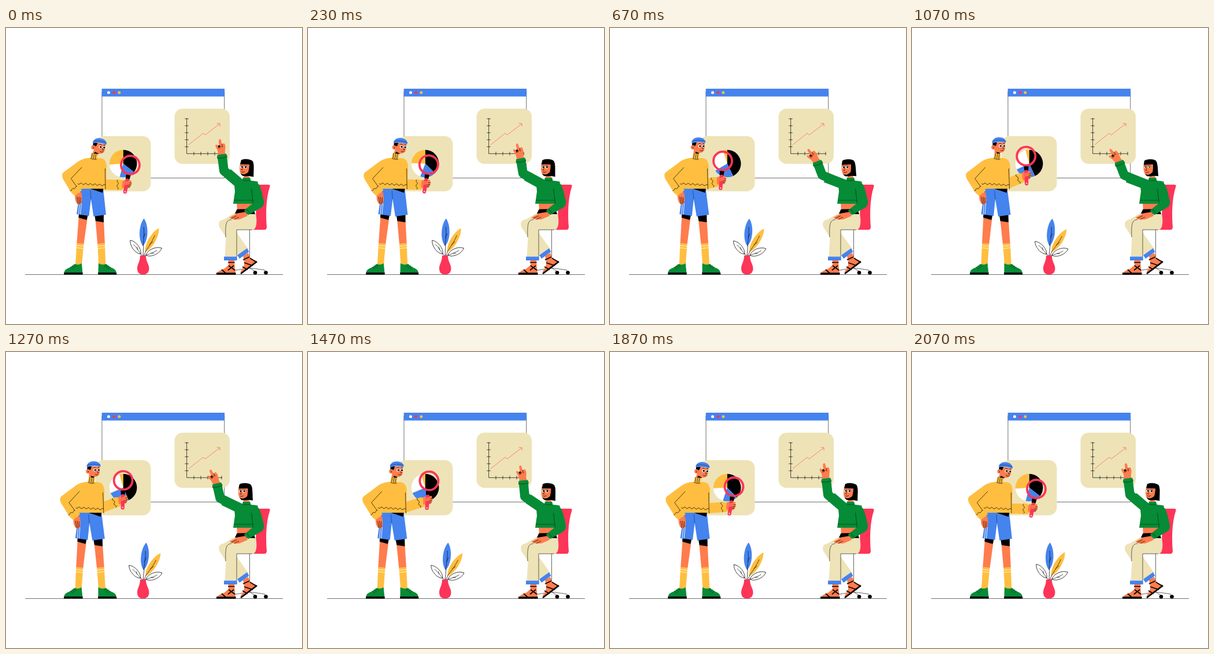
An HTML page with a canvas that plays this animation: 512x512 px, repeating every 2.1 s.

```html
<!DOCTYPE html>
<html>
<head>
<meta charset="utf-8">
<style>
html, body { margin: 0; width: 100%; height: 100%; overflow: hidden; background: #fff; }
canvas { display: block; width: 512px; height: 512px; }
</style>
</head>
<body>
<canvas id="stage" width="512" height="512"></canvas>
<script>
const ctx = document.getElementById('stage').getContext('2d');
const LOOP = 2100;
const BLUE = '#4583ee', RED = '#fd3558', YELLOW = '#ffbe40', GREEN = '#068b36';
const SKIN = '#ff7c4d', SAND = '#eee3b7', INK = '#000', WHITE = '#fff';
const TIMES = [0, 430, 670, 1070, 1470, 1670, 2070];

// Monotone cubic through one value per key time; the loop closes on the first.
function key(t, ...vals) {
  const v = [...vals, vals[0]];
  const last = TIMES.length - 1;
  if (t >= TIMES[last]) return v[last];
  const slope = i => (v[i + 1] - v[i]) / (TIMES[i + 1] - TIMES[i]);
  const tangent = i => {
    if (i === 0 || i === last) return 0;
    const a = slope(i - 1), b = slope(i);
    return a * b <= 0 ? 0 : 2 * a * b / (a + b);
  };
  let i = 0;
  while (t >= TIMES[i + 1]) i++;
  const h = TIMES[i + 1] - TIMES[i], u = (t - TIMES[i]) / h;
  const w = 1 - u;
  return v[i] * (1 + 2 * u) * w * w + v[i + 1] * u * u * (3 - 2 * u) +
    h * (tangent(i) * u * w * w - tangent(i + 1) * u * u * w);
}

const manLean = t => key(t, 0, -2, -3, -4, -3, -2);

function fill(d, color) {
  ctx.fillStyle = color;
  ctx.fill(new Path2D(d));
}

function line(d, color = INK, width = 0.7) {
  ctx.strokeStyle = color;
  ctx.lineWidth = width;
  ctx.stroke(new Path2D(d));
}

function dot(x, y, r, color) {
  ctx.fillStyle = color;
  ctx.beginPath();
  ctx.arc(x, y, r, 0, Math.PI * 2);
  ctx.fill();
}

function panel(x, y, w, h) {
  ctx.fillStyle = SAND;
  ctx.beginPath();
  ctx.roundRect(x, y, w, h, 14);
  ctx.fill();
}

function group(x, y, deg, draw) {
  ctx.save();
  ctx.translate(x, y);
  ctx.rotate(deg * Math.PI / 180);
  draw();
  ctx.restore();
}

function wave(x1, y1, x2, y2, turns, amp) {
  const len = Math.hypot(x2 - x1, y2 - y1);
  const nx = (y1 - y2) / len, ny = (x2 - x1) / len;
  ctx.beginPath();
  for (let i = 0; i <= 60; i++) {
    const u = i / 60, s = amp * Math.sin(u * turns * Math.PI * 2);
    ctx.lineTo(x1 + (x2 - x1) * u + nx * s, y1 + (y2 - y1) * u + ny * s);
  }
  ctx.strokeStyle = INK;
  ctx.lineWidth = 0.8;
  ctx.stroke();
}

function eye(x, y, open) {
  if (open < 0.25) {
    line(`M${x - 2.5} ${y}Q${x} ${y + 2} ${x + 2.5} ${y}`, INK, 0.9);
    return;
  }
  ctx.save();
  ctx.translate(x, y);
  ctx.scale(1, open);
  dot(0, 0, 2.5, WHITE);
  dot(0.5, 0, 1.6, INK);
  ctx.restore();
}

function blink(t, at) {
  return Math.min(1, Math.abs(t - at) / 110);
}

function board() {
  line('M166 110V259.5H377.7V110', '#333');
  ctx.fillStyle = BLUE;
  ctx.fillRect(165.7, 105, 212.4, 13.5);
  [WHITE, RED, YELLOW].forEach((c, i) => dot(177.5 + i * 9.2, 111.8, 2.5, c));
  panel(155, 187, 95.5, 95.5);
  panel(291.5, 139.5, 95.5, 95.5);
  line('M312.6 156V217.3H374');
  for (let i = 0; i < 5; i++) {
    line(`M309.3 ${157 + i * 12.1}h6.5M${325 + i * 12} 214.2v6.2`);
  }
  line('M316 202L341 182L344.5 185L370 165.5M364.5 165L370 165.3L370 170.5', '#f55');
}

function pie(t) {
  const cuts = [0,
    key(t, 128, 143, 154, 155, 158, 148),
    key(t, 195, 212, 240, 245, 247, 207),
    key(t, 266, 284, 343, 345, 343, 272), 360];
  [INK, BLUE, WHITE, YELLOW].forEach((c, i) => {
    const [a, b] = [cuts[i], cuts[i + 1]].map(d => (d - 90) * Math.PI / 180);
    ctx.fillStyle = c;
    ctx.beginPath();
    ctx.moveTo(202.7, 234.5);
    ctx.arc(202.7, 234.5, 23.8, a, b);
    ctx.fill();
  });
}

function leaf(x, y, len, w, deg, color) {
  group(x, y, deg, () => {
    const d = `M0 0C${-w} ${-len * 0.2} ${-w} ${-len * 0.75} 0 ${-len}` +
      `C${w} ${-len * 0.75} ${w} ${-len * 0.2} 0 0Z`;
    fill(d, color);
    if (color === WHITE) line(d);
    line(`M0 0Q${w * 0.2} ${-len * 0.5} 0 ${-len * 0.7}` +
      `M0 ${-len * 0.3}l${w * 0.35} ${-len * 0.16}`, INK, 0.6);
  });
}

function plant(t) {
  const sway = key(t, 0, 0.15, 0.6, 1, 0.95, 0.7);
  group(237, 394, sway * 3.5, () => {
    line('M0 0L1 -20M1 0L7 -12');
    leaf(0, -17, 47.5, 9, 2, BLUE);
    leaf(4, -7, 47, 8, 30, YELLOW);
  });
  group(236, 394, -sway * 5, () => {
    line('M0 0L-4 -5');
    leaf(-3, -3, 30, 7, -37, WHITE);
  });
  group(239, 394, sway * 2.5, () => {
    line('M0 0L4 -2');
    leaf(3, -1, 30, 7.5, 66, WHITE);
  });
  fill('M232 393.5H242C242 405 247.5 408 247.5 416C247.5 423 243 426.5 237.2 426.5' +
    'C231 426.5 227 423 227 416C227 408 232 405 232 393.5Z', RED);
}

function manLegs() {
  fill('M126 324H141.5L134.5 374H122.3Z', SKIN);
  fill('M154 324H168.7L171 374H158.3Z', SKIN);
  fill('M126 322H142L139.5 332L125.5 328Z', INK);
  fill('M153 322H169L169 336L155 334Z', INK);
  fill('M122.3 372L134.5 373L131 411H120Z', YELLOW);
  fill('M158.3 373L171 372L172.3 411H160.5Z', YELLOW);
  line('M121.8 376L134 377.5M121.4 380L133.6 381.5M158.4 377.5L171.5 376M158.8 381.5L171.8 380', '#fff3d0', 1);
  fill('M119.5 408Q125 411 131 407L132.5 424H100.5C100.5 418 106 416 111 414Z', GREEN);
  fill('M160 407Q167 411 172.5 408L181 414C186 416 191 418 191 424H159.5Z', GREEN);
  fill('M100.5 423H132.7V426.5H100Z', INK);
  fill('M159.3 423H191L191.5 426.5H159.3Z', INK);
  line('M111 413l5 4M114 411l5 4M117 409l5 4M181 413l-5 4M178 411l-5 4M175 409l-5 4', '#033d18', 0.8);
}

function manShorts() {
  fill('M129 276H168L173 323L151.5 326L147 296L143.5 325L122 322Z', BLUE);
  fill('M140 276H168.5L167 285Z', INK);
  line('M147 296L146 281', '#1a3a78');
  line('M127.5 302L125.5 322M130.5 303L128.5 322.5', WHITE, 0.9);
}

function manTorso() {
  fill('M119.5 286L130.5 284C132 292 132 299 130 304C128 306 126 306 123 304C119 299 119 293 119.5 286Z', SKIN);
  line('M123 292L124.5 304M126 292L127 305M129 293L129 303');
  fill('M146 224.5C136 225 129 227.5 122 233L99 250C96 253 97 258 99 262L113 285L119 290.5L131 281L130 278' +
    'H172.5L174 244C174.5 233 172 226 163 225Z', YELLOW);
  line('M131 241L112.5 260.5L122 274M171.5 243L172 279');
  wave(124, 269, 172, 272, 6, 1.2);
  wave(110.5, 281.5, 123, 274, 2, 0.9);
  fill('M147.5 216L158.5 218L157 227L146 225Z', YELLOW);
  line('M149.5 216.5L148 225M152.7 217L151.2 226M155.7 217.5L154.4 226.5M146 225.5Q151 228 157 227');
}

function manHead(t) {
  const x = key(t, 161, 156.5, 153, 150.5, 153.5, 156.5);
  const y = key(t, 205.5, 204.8, 204.2, 204, 204.2, 204.8);
  const lean = manLean(t) * 1.14;
  line(`M${152 + lean} 223L${x - 3} ${y + 4}`, SKIN, 9.5);
  fill(`M${x - 4} ${y + 7}L${x + 3} ${y + 11}L${154 + lean} 219L${151 + lean} 217Z`, INK);
  group(x, y, key(t, 9, 4, 1.5, 0, 1.5, 4), () => {
    fill('M-10 -6H10C11 0 11 4 10 7C8 11 4 12.3 0 11.5C-5 10.5 -8 8 -9 4Z', SKIN);
    fill('M-11 -6H-3.5L-5 -1L-8 2L-11 0Z', INK);
    dot(-9.6, 2.5, 3.7, SKIN);
    line('M-10.5 1.5Q-8 2 -9.5 4.5');
    fill('M-12 -4.5C-12 -12 -6 -15 0 -15C7 -15 12 -12 12 -5.5Q0 -8.5 -12 -4.5Z', BLUE);
    line('M-11.7 -8Q0 -12 12 -8.5', '#173a80');
    const open = blink(t, 430);
    eye(2.2, 0, open);
    eye(8.4, 0, open);
    line('M0 -4Q2 -5.2 4 -4M7 -4Q9 -5 10.5 -4');
    line('M6 1L8.5 4.2L6 4.8M2.5 7.5Q7 9.5 8.5 6.5');
  });
}

function sleeve(t, x, y, deg) {
  const lean = manLean(t);
  const a = deg * Math.PI / 180;
  const wx = x - 6 * Math.cos(a) - 36.5 * Math.sin(a);
  const wy = y - 6 * Math.sin(a) + 36.5 * Math.cos(a);
  const ex = 168 + lean, ey = 271 + lean * 0.3;
  const tilt = Math.atan2(wy - ey, wx - ex) * 180 / Math.PI;
  const len = Math.hypot(wx - ex, wy - ey);
  group(ex, ey, tilt, () => {
    fill(`M-4 -9H${len - 4}L${len + 1} -7V7L${len - 2} 8.5H-4Z`, YELLOW);
    wave(len - 9, -9, len - 9, 8, 2, 1.2);
  });
}

function lens(x, y, deg) {
  group(x, y, deg, () => {
    ctx.beginPath();
    ctx.arc(0, 0, 16, 0, Math.PI * 2);
    ctx.strokeStyle = RED;
    ctx.lineWidth = 3.8;
    ctx.stroke();
    fill('M-4 17.5H4L3.3 25H-3.3Z', INK);
    ctx.lineCap = 'round';
    fill('M-8 29L-2 26L4 28L3 41L-7 41Z', SKIN);
    line('M-3 31L5.5 27.5M-3 34L7 31M-3 37.5L6.5 34.5M-3 40L5 38', SKIN, 3.6);
    line('M0 33L7.5 29.7M0 36.2L7.8 33.2M0 39.2L6.8 36.6');
    line('M0 27V47.3', RED, 6.3);
    dot(0, 47, 1.3, '#ffc5ce');
    line('M-2 31L3 29M-2 34.3L3.5 32', SKIN, 2.4);
    ctx.lineCap = 'butt';
  });
}

function man(t) {
  const lean = manLean(t);
  const x = key(t, 215, 201, 195, 197.3, 209.4, 213.2);
  const y = key(t, 237, 235, 230, 221.7, 222.9, 226.8);
  const deg = key(t, 11, 7, 4.5, -1, 4.5, 7);
  sleeve(t, x, y, deg);
  manHead(t);
  ctx.save();
  ctx.transform(1, 0, -lean / 177, 1, lean * 427 / 177, 0);
  manLegs();
  manShorts();
  manTorso();
  ctx.restore();
  lens(x, y, deg);
}

function chair() {
  fill('M434 271H454Q457 271 456.5 274C449 296 449.5 325 451 344Q451 349 447 349H398V344L432 330Z', RED);
  line('M421.5 349V415M394 419.5L421 415L447 418.5L449 422M421 415L431 421', '#222');
  dot(431, 423.3, 3.3, INK);
  dot(449.5, 423.3, 3.3, INK);
}

function womanLegs() {
  fill('M410 394L419 389L423 399L434 403L407 425L406 421Q413 412 412 405Z', SKIN);
  line('M406 425L434 404', INK, 2.8);
  line('M410 401L421 396M409 413L418 418M412 406L427 411M422 398L433 405', INK, 1.7);
  fill('M384.5 401H395L395.5 410L397 424H365Q367 420 378 416L385 410Z', SKIN);
  fill('M364 423.3H397.5V426.8H364Z', INK);
  line('M384 405.5H395.5M385 411L396 419M373 418L380 424M394 411L384 419', INK, 1.7);
  fill('M384 345L399 354L419 382L402 395L385 366Z', SAND);
  fill('M400 393L417 381L420.5 387L404 399Z', BLUE);
  fill('M397 319L432 322C435 335 433 349 427 349H399V396H378.5L380.5 362L370 346C366 339 368 332 377 331Z', SAND);
  fill('M377 395.5H399.7V402H377Z', BLUE);
  line('M399 349V395.5M390 331.5C381 332 379 338 380 362M399 349H426', '#222');
}

function womanTorso() {
  fill('M399 302H427L426 316H400Z', SKIN);
  fill('M399.5 313.5L428 313L431 322L396 321Z', INK);
  fill('M404 264.5C412 263.5 430 263.5 436 266L430 282L428.5 304H393L396 283L395 272Z', GREEN);
  line('M394 298H428', '#033d18');
  fill('M415 318L400 320.5L387 327.5C388 331 396 332 404 331L418 325Z', SKIN);
  line('M390 329L399 325M395 331L403 327');
  fill('M428 265C439 265.5 441 277 446 299C447 306 444 310 438 312.5L419 323.5L411.5 316L427 303Z', GREEN);
  line('M424.5 278L427.5 303.5M416 313L422.5 321', '#022f12');
}

function womanHead(t) {
  const turn = key(t, 1, 0.3, 0, 0, 0.85, 1);
  fill('M411.5 248H421L420 262H411.5Z', SKIN);
  group(413 + turn * 3.6, 242, turn * 6 - 1, () => {
    fill('M-10.5 8Q-3 12 5 5L6 13Q0 15 -3 14.5C-7 15 -10 12 -10.5 8Z', INK);
    fill('M-12 -8C-13 0 -12.5 5 -11 9C-8 12.5 -4 12 -1 10.5L6 5V-8Z', SKIN);
    fill('M4 -9V0Q3 8 2.5 13.5L13 14.5C12 5 12.5 -4 10.5 -9Z', INK);
    fill('M-11 -12.5C-7 -16 5 -16 9 -12.5Q11 -10 11 -6H4L1 -6L-12 -5.5Z', INK);
    const open = Math.max(0.5, blink(t, 1100));
    eye(-9, -1, open);
    eye(-2.8, -1.2, open);
    line('M-11.5 -3.2Q-9 -4.5 -7 -3.2M-5.3 -3.4Q-2.5 -4.8 -0.3 -3.2M-7 0L-9 4L-6.5 4.5M-9 7.5Q-6 9 -3 6.5');
  });
  fill('M410 258.5Q416 260 422 258.5L424 266H408Z', GREEN);
  line('M410 263.5Q416 265 422.5 263.5', '#033d18');
}

function raisedArm(t) {
  const wx = key(t, 373.5, 361.5, 358.5, 358.5, 372.5, 374.2);
  const wy = key(t, 220, 232.5, 232, 232, 223.5, 220);
  const ex = key(t, 377, 367.5, 367, 367, 375, 377);
  const ey = key(t, 247, 255.5, 254.5, 254.5, 250, 247);
  group(wx, wy, key(t, -8, -23, -36, -36, -12, -8), () => {
    fill('M-6 1L-6.5 -10L-9 -17Q-8.5 -21 -6 -19L-2.5 -15L-2 -26Q0 -29.5 2 -26.5L2.7 -19L6 -20Q8.5 -19 8 -13L6 -5L6 1Z', SKIN);
    line('M-5 -13.5L-2 -13L1 -16M2.7 -19L3 -13.5');
    dot(-2.8, -16, 1.8, INK);
  });
  ctx.lineJoin = 'round';
  line(`M${wx} ${wy}L${ex} ${ey}L407 271.5`, GREEN, 16);
  line(`M${ex + 6} ${ey + 4}L407 271.5`, GREEN, 17.5);
  ctx.lineJoin = 'miter';
  const tilt = Math.atan2(wx - ex, ey - wy) * 180 / Math.PI;
  group(wx, wy, tilt, () => {
    fill('M-7.5 -1.5H7.5L9 3L8 6H-8L-9 3Z', GREEN);
    line('M-8.3 4Q0 6 8.3 4', '#033d18');
  });
}

function woman(t) {
  chair();
  womanLegs();
  raisedArm(t);
  womanTorso();
  womanHead(t);
}

function frame(now) {
  const t = now % LOOP;
  ctx.fillStyle = WHITE;
  ctx.fillRect(0, 0, 512, 512);
  board();
  pie(t);
  line('M33 426.5H479', '#333');
  plant(t);
  man(t);
  woman(t);
}

const start = performance.now();
function tick() {
  frame(performance.now() - start);
  requestAnimationFrame(tick);
}
tick();
</script>
</body>
</html>
```
